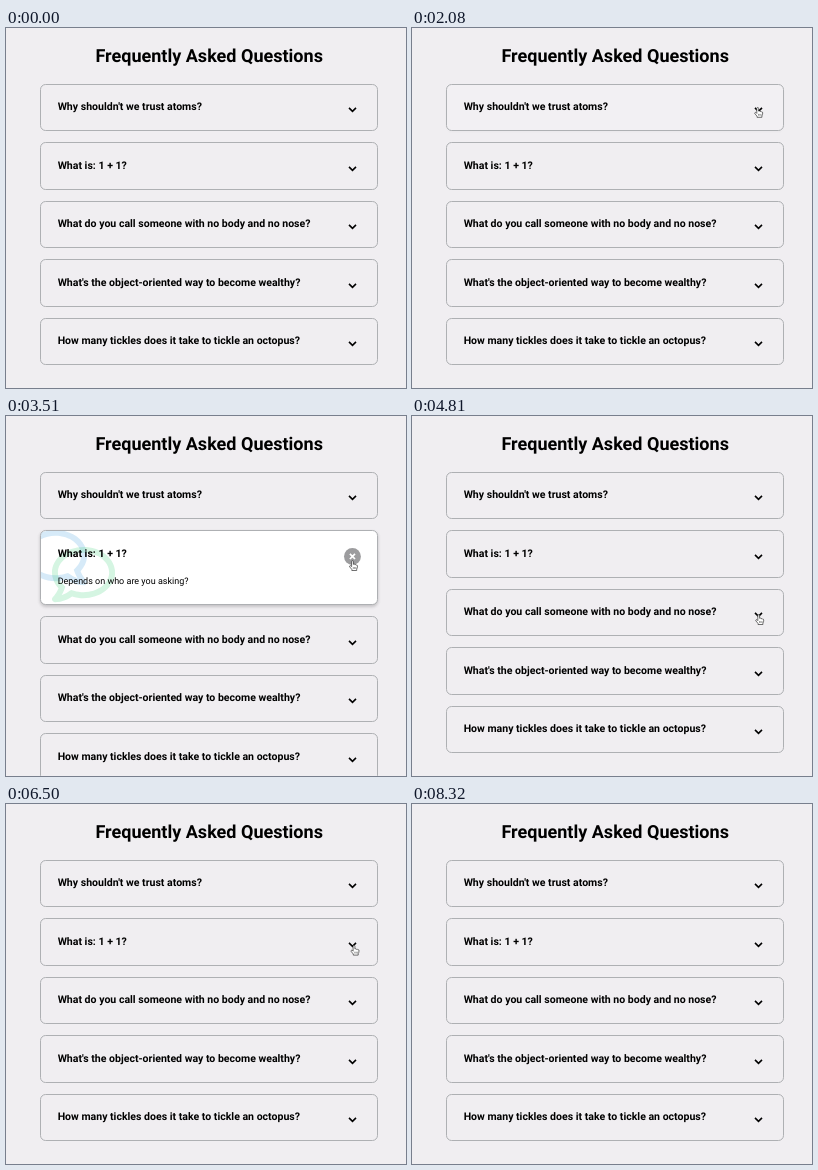
Animation, 400 px wide and 360 px high, one loop 8.84 s. Source, as an HTML page:

```html
<!DOCTYPE html>
<html lang="en">
<head>
<meta charset="utf-8">
<title>Frequently Asked Questions</title>
<style>
  html, body { margin: 0; width: 100%; height: 100%; overflow: hidden; }
  body {
    position: relative;
    background: #f0eef1;
    color: #000;
    font: 9.01px Roboto, sans-serif;
    text-rendering: geometricPrecision;
  }
  h1, h3, p { margin: 0; }
  h1 {
    position: absolute; left: 34.2px; top: 17.8px; width: 338px;
    font-size: 18.03px; line-height: 21.1px; text-align: center;
  }
  #list { position: absolute; left: 34.2px; top: 55.8px; width: 338px; }
  .faq {
    --fade: 0;
    position: relative; box-sizing: border-box; overflow: hidden;
    margin-bottom: 11.27px; padding: 16.46px;
    border: 1px solid #aeb0b3; border-radius: 5.6px;
    background: rgba(255, 255, 255, var(--fade));
    box-shadow: 0 1.7px 3.4px rgba(0, 0, 0, calc(var(--fade) * .1)),
                0 1.7px 3.4px rgba(0, 0, 0, calc(var(--fade) * .1));
  }
  h3 { position: relative; font-size: 10.55px; line-height: 12.36px; white-space: nowrap; }
  p { position: relative; margin-top: 16.9px; line-height: 10.56px; }
  svg { position: absolute; overflow: visible; }
  .bubble { width: 63.1px; height: 63.1px; opacity: .2; }
  .blue { left: -17px; top: -5.7px; fill: #3498db; transform: scaleX(-1); }
  .green { left: 11.2px; top: 11.2px; fill: #2ecc71; }
  .toggle {
    top: 16.46px; right: 16.46px; width: 16.9px; height: 16.9px;
    fill: none; stroke: #000; stroke-width: 1.6;
  }
  .toggle circle { fill: #9c9c9e; stroke: none; }
  .cross { stroke: #fff; stroke-width: 1.7; }
  .faq:not(.open) :is(.bubble, p, circle, .cross), .open .chevron { display: none; }
  #cursor { left: 0; top: 0; width: 1px; height: 1px; }
  #hand { fill: #fff; stroke: #333; stroke-width: .7; stroke-linejoin: round; }
  #arrow { fill: #000; stroke: #fff; stroke-width: .6; }
</style>
</head>
<body>
<h1>Frequently Asked Questions</h1>
<div id="list"></div>

<svg id="cursor">
  <g id="hand">
    <path d="M-.9 .9a.9 .9 0 0 1 1.8 0V3.6Q2 3.1 2.4 4Q3.5 3.5 3.8 4.4Q5 4.2 5 5.4Q5 7.2 4.2 8.4V9.8H-.7V8.7L-2.8 6.2Q-3.3 5.2-2.3 4.9Q-1.6 4.9-.9 5.9Z"/>
    <path d="M.8 6.4V8.2M2.1 6.4V8.2M3.3 6.4V8.2" stroke-width=".5"/>
  </g>
  <path id="arrow" d="M0 0V8.2L1.9 6.4L3.2 9.4L4.5 8.8L3.2 5.9H5.8Z"/>
</svg>

<svg width="0" height="0">
  <symbol id="comment" viewBox="0 0 512 512">
    <path d="M256 32C114.6 32 0 125.1 0 240c0 47.6 19.9 91.2 52.9 126.3C38 405.7 7 439.1 6.5 439.5c-6.6 7-8.4 17.2-4.6 26S14.4 480 24 480c61.5 0 110-25.7 139.1-46.3C192 442.8 223.2 448 256 448c141.4 0 256-93.1 256-208S397.4 32 256 32zm0 368c-26.7 0-53.1-4.1-78.4-12.1l-22.7-7.2-19.5 13.8c-14.3 10.1-33.9 21.4-57.5 29 7.3-12.1 14.4-25.7 19.9-40.2l10.6-28.1-20.6-21.8C69.7 314.1 48 282.2 48 240c0-88.2 93.3-160 208-160s208 71.8 208 160-93.3 160-208 160z"/>
  </symbol>
</svg>

<script>
const LOOP = 8840, STEP = 130, FADE = 300;

const entries = [
  ["Why shouldn't we trust atoms?", "They make up everything."],
  ["What is: 1 + 1?", "Depends on who are you asking?"],
  ["What do you call someone with no body and no nose?", "Nobody knows."],
  ["What's the object-oriented way to become wealthy?", "Inheritance."],
  ["How many tickles does it take to tickle an octopus?", "Ten-tickles!"]
];

// item, opened at, closed at
const clicks = [[0, 1040, 2080], [1, 3250, 3770], [2, 4940, 5720], [1, 6630, 7280]];

// time, x, y of the pointer tip
const path = [
  [260, 300, 350], [910, 346, 82], [1300, 346, 82], [1430, 345.7, 79.5],
  [2080, 345.7, 79.5], [2600, 345.5, 138], [2730, 345.5, 138], [2990, 346.5, 144.7],
  [4030, 346.5, 144.7], [4810, 346.7, 198.7],
  [5720, 346.7, 198.7], [6500, 348, 141.3],
  [7670, 348, 141.3], [8190, 242.8, 345]
];

const list = document.getElementById("list");
list.innerHTML = entries.map(([question, answer]) => `
  <div class="faq">
    <svg class="bubble blue"><use href="#comment"/></svg>
    <svg class="bubble green"><use href="#comment"/></svg>
    <h3>${question}</h3>
    <p>${answer}</p>
    <svg class="toggle" viewBox="0 0 16.9 16.9">
      <circle cx="8.45" cy="8.45" r="8.45"/>
      <path class="chevron" d="M5 6.9L8.5 10.3L12 6.9"/>
      <path class="cross" d="M5.9 5.9L11 11M11 5.9L5.9 11"/>
    </svg>
  </div>`).join("");

const items = [...list.children];
const cursor = document.getElementById("cursor");
const hand = document.getElementById("hand");
const arrow = document.getElementById("arrow");

const easeOut = x => 1 - (1 - Math.min(x, 1)) ** 2;
const smooth = x => x * x * (3 - 2 * x);

function drawItems(t) {
  items.forEach((item, i) => {
    let open = false, fade = 0;
    for (const [n, start, end] of clicks) {
      if (n !== i || t < start) continue;
      open = t < end;
      fade = open ? easeOut((t - start + 65) / FADE) : 1 - easeOut((t - end + 195) / FADE);
    }
    item.classList.toggle("open", open);
    item.style.setProperty("--fade", fade);
  });
}

function drawCursor(t) {
  const next = path.findIndex(p => p[0] > t);
  const last = path[path.length - 1];
  const shown = t >= path[0][0] && t <= last[0];
  cursor.style.display = shown ? "" : "none";
  if (!shown) return;

  let [, x, y] = last;
  if (next > 0) {
    const [t0, x0, y0] = path[next - 1], [t1, x1, y1] = path[next];
    const k = smooth((t - t0) / (t1 - t0));
    x = x0 + (x1 - x0) * k;
    y = y0 + (y1 - y0) * k;
  }
  cursor.style.transform = `translate(${x}px, ${y}px)`;

  const onToggle = items.some(item => {
    const b = item.querySelector(".toggle").getBoundingClientRect();
    return x >= b.left && x <= b.right && y >= b.top && y <= b.bottom;
  });
  hand.style.display = onToggle ? "" : "none";
  arrow.style.display = onToggle ? "none" : "";
}

function draw(now) {
  const t = Math.floor((now % LOOP) / STEP) * STEP;
  drawItems(t);
  drawCursor(t);
}

const begin = performance.now();
function tick() {
  draw(performance.now() - begin);
  requestAnimationFrame(tick);
}
tick();
</script>
</body>
</html>
```
